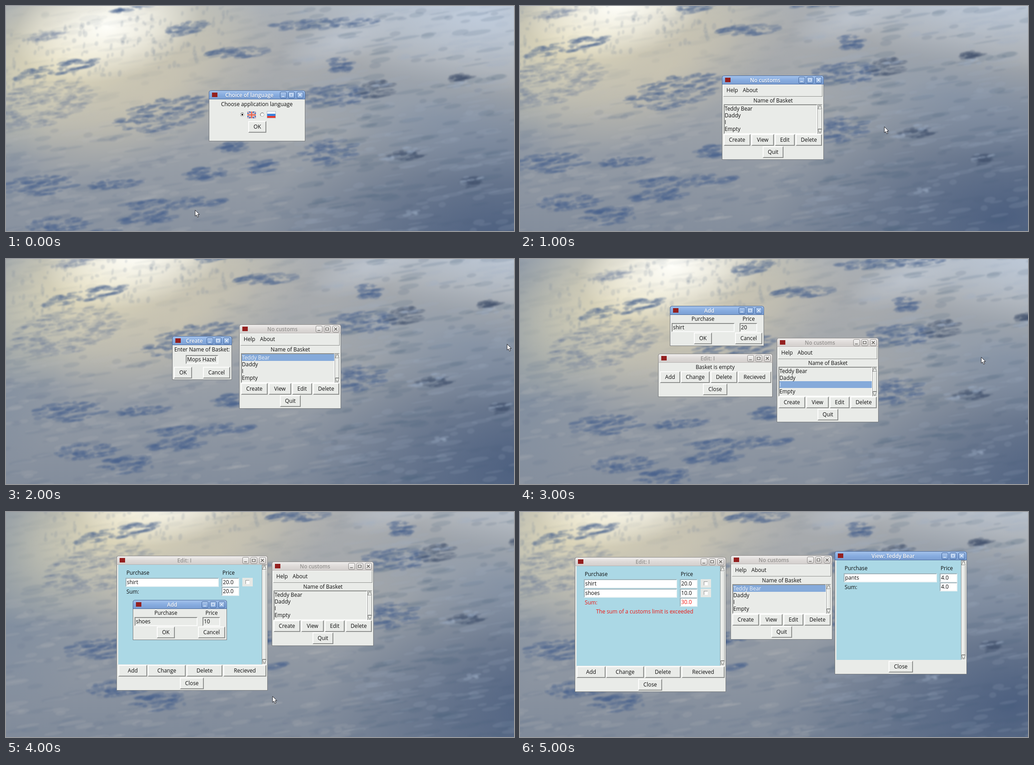
These frames come from a looping animation (1122 by 499 pixels, 6000 ms). An HTML page with a canvas:

```html
<!DOCTYPE html>
<html lang="en">
<head>
<meta charset="utf-8">
<title>Basket windows</title>
<style>
  html, body { margin: 0; width: 100%; height: 100%; overflow: hidden; }
  #stage { position: relative; width: 1122px; height: 499px; overflow: hidden; }
  #strip { position: absolute; left: 0; top: 0; width: 1122px; height: 2994px; animation: cut 6s steps(6) infinite; }
  #strip > canvas { position: absolute; left: 0; top: 0; }
  @keyframes cut { to { transform: translateY(-2994px); } }

  .scene { position: relative; width: 1122px; height: 499px; overflow: hidden; }
  .scene div, .scene svg { position: absolute; box-sizing: border-box; }
  .scene { font: 11.8px/16px "Open Sans", "Noto Sans", sans-serif; color: #0c0c0c; white-space: pre; }

  .win { background: #e9ebe8; border: 1px solid #777a7c; border-top: 0; border-radius: 5px 5px 0 0; }
  .bar { border: 1px solid #8d8b89; border-bottom-color: #b5b2b0; border-radius: 5px 5px 0 0;
         background: linear-gradient(#efedec, #dedad8 50%, #d3cfcd); }
  .on > .bar { border-color: #4a6a9c; background: linear-gradient(#a3c1ea, #88ade0 50%, #7b9fd3); }
  .title { text-align: center; font-weight: 600; font-size: 11.7px; color: #959391; }
  .on > .title { color: #fff; text-shadow: 0 1px 1px #4f70a3; }
  .icon { background: #94201f; }
  .tool { border: 1px solid #8b8987; border-radius: 3px; background: linear-gradient(#f5f4f3, #d6d3d1); color: #55534f; }
  .on > .tool { border-color: #44669c; background: linear-gradient(#a9c5eb, #7da2d6); color: #f4f8fd; }
  .tool svg { left: 0; top: 0; fill: none; stroke: currentColor; stroke-width: 1.2; }

  .mid { text-align: center; }
  .btn { text-align: center; border: 2px solid; border-color: #fdfdfc #8f918f #8f918f #fdfdfc; background: #e9ebe8;
         line-height: 21px; }
  .menu { border: 1px solid; border-color: #fcfcfb #8f918f #8f918f #fcfcfb; }
  .field { border: 2px solid; border-color: #8c8e8c #fafbfa #fafbfa #8c8e8c; padding-left: 1px; background: #e9ebe8; line-height: 15px; }
  .white { background: #fff; border-color: #9fb3ba #eef3f4 #eef3f4 #9fb3ba; }
  .pick { background: #85aada; }
  .pale { color: #eef1f5; }
  .red { color: #f01410; }
  .sheet { background: #abd8e5; }
  .check { background: #e6e8e5; }
  .tick { border: 1px solid; border-color: #8c8e8c #f6f6f5 #f6f6f5 #8c8e8c; background: #fff; }
  .rail { background: #c8cac7; border: 1px solid; border-color: #8c8e8c #fafbfa #fafbfa #8c8e8c; }
  .thumb { background: #e9ebe8; border: 1px solid; border-color: #fdfdfc #858785 #858785 #fdfdfc; }
</style>
</head>
<body>
<div id="stage"><div id="strip"><canvas id="sky" width="1122" height="2994"></canvas></div></div>
<script>
const W = 1122, H = 499;

// ---------- widgets ----------
const box = (cls, x, y, w, h, inner = '') =>
  `<div class="${cls}" style="left:${x}px;top:${y}px;width:${w}px;height:${h}px">${inner}</div>`;
const text = (x, y, s, cls = '') => `<div class="${cls}" style="left:${x}px;top:${y - 8}px">${s}</div>`;
const mid = (x, y, s) => box('mid', x - 110, y - 8, 220, 16, s);
const btn = (x, y, w, s) => box('btn', x, y, w, 26, s);
const field = (x, y, w, s, cls = '') => box('field ' + cls, x, y, w, 20, s);

const scroll = (x, y, h) => box('rail', x, y, 11, h) + box('thumb', x + 1, y + 11, 9, h - 22) +
  `<svg style="left:${x}px;top:${y}px" width="11" height="${h}" fill="#e9ebe8" stroke="#858785">
    <path d="M5.5 1.5 L10 10.5 H1 Z M1 ${h - 10.5} H10 L5.5 ${h - 1.5} Z"/></svg>`;

const glyphs = ['M3 9.5 H9', 'M3 3.5 H9.5 V9 H3 Z', 'M3 3 L9.5 9.5 M9.5 3 L3 9.5'];

function win(x, y, w, h, title, active, body) {
  const tools = [56, 38, 19].map((d, i) =>
    box('tool', w - d, 3, 15, 15, `<svg width="13" height="13"><path d="${glyphs[i]}"/></svg>`)).join('');
  return `<div style="left:${x}px;top:${y}px" class="${active ? 'on' : ''}">` +
    box('win', 0, 0, w, h) + box('bar', 0, 0, w, 20) + box('icon', 7, 5, 12, 10) +
    box('title', 22, 2, w - 78, 16, title) + tools + body + '</div>';
}

// ---------- windows ----------
function mainWin(x, y, picked = -1, active = false) {
  const rows = ['Teddy Bear', 'Daddy', 'I', 'Empty'].map((s, i) =>
    (i === picked ? box('pick', 6, 66 + 15 * i, 204, 15) : '') +
    text(6, 73 + 15 * i, s, i === picked ? 'pale' : '')).join('');
  return win(x, y, 225, 187, 'No customs', active,
    box('menu', 3, 20, 219, 27) + text(10, 32, 'Help') + text(46, 32, 'About') +
    mid(113, 55, 'Name of Basket') + box('field', 4, 64, 207, 66) + rows + scroll(211, 64, 66) +
    btn(4, 130, 59, 'Create') + btn(65, 130, 50, 'View') + btn(117, 130, 44, 'Edit') +
    btn(163, 130, 58, 'Delete') + btn(90, 157, 46, 'Quit'));
}

const addWin = (x, y, item, price) => win(x, y, 208, 89, 'Add', true,
  mid(73, 28, 'Purchase') + mid(174, 28, 'Price') + field(4, 38, 139, item) + field(154, 38, 39, price) +
  btn(53, 59, 40, 'OK') + btn(144, 59, 60, 'Cancel'));

function sheet(w, items, sum, over, checks) {
  const tone = over ? 'red' : '', end = 49 + 20.7 * items.length | 0;
  return box('sheet', 4, 20, w - 14, 221) + scroll(w - 10, 20, 221) +
    text(22, 37, 'Purchase') + text(234, 37, 'Price') +
    items.map(([s, p], i) => {
      const y = 49 + 21 * i;
      return field(20, y, 206, s, 'white') + field(232, y, 39, p, 'white') +
        (checks ? box('check', 278, y, 23, 19) + box('tick', 285, y + 5, 9, 9) : '');
    }).join('') +
    text(22, end + 10, 'Sum:', tone) + field(232, end, 39, sum, 'white ' + tone);
}

const editWin = (x, y, items, sum, over) => win(x, y, 334, 299, 'Edit: I', false,
  sheet(331, items, sum, over, true) +
  (over ? text(47, 120, 'The sum of a customs limit is exceeded', 'red') : '') +
  btn(4, 242, 64, 'Add') + btn(69, 242, 84, 'Change') + btn(155, 242, 79, 'Delete') +
  btn(236, 242, 95, 'Recieved') + btn(140, 270, 53, 'Close'));

const radio = (x, dot) => `<circle cx="${x}" cy="9" r="4" fill="#fff" stroke="#b5b7b4"/>
  <path d="M${x - 3} 12 A4 4 0 0 1 ${x + 3} 6" fill="none" stroke="#777"/>` +
  (dot ? `<circle cx="${x}" cy="9" r="1.9" fill="#111"/>` : '');
const choices = `<svg style="left:70px;top:45px" width="82" height="18">${radio(4, true)}${radio(48)}
  <rect x="15" y="2" width="19" height="15" fill="#2f62b4"/>
  <path d="M15 2 L34 17 M34 2 L15 17" stroke="#e6e6ee" stroke-width="2.6"/>
  <path d="M15 2 L34 17 M34 2 L15 17" stroke="#e0695f"/>
  <path d="M24.5 2 V17 M15 9.5 H34" stroke="#f0dcd8" stroke-width="4.4"/>
  <path d="M24.5 2 V17 M15 9.5 H34" stroke="#e8624a" stroke-width="2.6"/>
  <rect x="59" y="2" width="18" height="5" fill="#f8f8f8"/>
  <rect x="59" y="7" width="18" height="5" fill="#3c82dc"/>
  <rect x="59" y="12" width="18" height="5" fill="#ea3a2c"/>
  <rect x="58.5" y="1.5" width="19" height="15" fill="none" stroke="#b4bcc8"/></svg>`;

const pointer = (x, y) => `<svg style="left:${x}px;top:${y}px" width="14" height="20">
  <path d="M.8 .8 V14 L3.8 11.3 L6 16.4 L8.4 15.4 L6.2 10.4 H10.2 Z" fill="#fff" stroke="#1c1c22"/></svg>`;

// ---------- scenes: [sky dx, sky dy, markup] ----------
const scenes = [
  [0, 0, win(448, 187, 213, 113, 'Choice of language', true,
    mid(106, 30, 'Choose application language') + choices + btn(87, 68, 40, 'OK')) + pointer(417, 452)],
  [-7, -50, mainWin(446, 154, -1, true) + pointer(804, 267)],
  [63, -59, mainWin(515, 145, 0) + win(367, 171, 132, 97, 'Create', true,
    mid(66, 29, 'Enter Name of Basket:') + field(30, 42, 72, 'Mops Hazel') +
    btn(4, 68, 40, 'OK') + btn(68, 68, 60, 'Cancel')) + pointer(1106, 188)],
  [114, -30, mainWin(567, 175, 2) + win(305, 210, 253, 96, 'Edit: I', false,
    mid(126, 29, 'Basket is empty') + btn(4, 39, 45, 'Add') + btn(50, 39, 64, 'Change') +
    btn(116, 39, 59, 'Delete') + btn(176, 39, 74, 'Recieved') + btn(99, 66, 54, 'Close')) +
    addWin(331, 104, 'shirt', '20') + pointer(1018, 217)],
  [134, -94, editWin(244, 97, [['shirt', '20.0']], '20.0', false) + mainWin(587, 110) +
    addWin(280, 195, 'shoes', '10') + pointer(588, 408)],
  [12, -92, editWin(121, 100, [['shirt', '20.0'], ['shoes', '10.0']], '30.0', true) + mainWin(465, 96, 0) +
    win(695, 87, 292, 273, 'View: Teddy Bear', true,
      sheet(289, [['pants', '4.0']], '4.0', false, false) + btn(119, 243, 54, 'Close'))]
];
document.getElementById('strip').insertAdjacentHTML('beforeend',
  scenes.map(s => `<div class="scene">${s[2]}</div>`).join(''));

// ---------- soft cloudy backdrop ----------
const PAD = 135, SW = 1270, SH = 600;
let seed = 11;
const rnd = () => (seed = seed * 16807 % 2147483647) / 2147483647;

function layer() {
  const c = document.createElement('canvas');
  c.width = SW; c.height = SH;
  const g = c.getContext('2d');
  g.translate(PAD, 0);
  return [c, g];
}
const [sky, g] = layer(), [marks, m] = layer();

function fade(stops) {
  const f = g.createLinearGradient(0, 0, 0, SH);
  stops.forEach((c, i) => f.addColorStop(i / (stops.length - 1), c));
  g.fillStyle = f;
  g.fillRect(-PAD, 0, SW, SH);
}
function glow(x, y, rx, ry, turn, rgb, a) {
  g.save();
  g.translate(x, y); g.rotate(turn); g.scale(rx, ry);
  const f = g.createRadialGradient(0, 0, 0, 0, 0, 1);
  f.addColorStop(0, `rgba(${rgb},${a})`);
  f.addColorStop(.45, `rgba(${rgb},${a * .6})`);
  f.addColorStop(1, `rgba(${rgb},0)`);
  g.fillStyle = f;
  g.fillRect(-1, -1, 2, 2);
  g.restore();
}
function streak(x, y, rx, ry, rgb, a, tilt = -.16) {
  m.fillStyle = `rgba(${rgb},${a})`;
  m.beginPath();
  m.ellipse(x, y, rx, ry, tilt, 0, 7);
  m.fill();
}

fade(['#aab0b6', '#a8abae', '#a3a7ab', '#969da6', '#8a93a0', '#7f8a9a']);
glow(-150, 200, 260, 350, 0, '112,130,154', .9);
glow(150, 110, 440, 200, -.35, '238,228,190', .9);
glow(330, 190, 320, 130, -.5, '204,198,178', .8);
glow(225, 45, 210, 120, -.2, '255,255,250', 1);
glow(1050, 20, 440, 170, .1, '194,207,224', .9);
glow(740, 75, 150, 55, -.35, '194,202,213', .7);
glow(1080, 520, 540, 340, -.15, '70,90,124', .9);
glow(960, 250, 330, 130, .2, '122,141,168', .5);

// general mottling, calmer where the sun falls
for (let i = 0; i < 1300; i++) {
  const x = rnd() * SW - PAD, y = rnd() * SH, right = x > 640;
  const light = rnd() < .5;
  streak(x, y, 8 + rnd() * 24, 1.5 + rnd() * 5,
    light ? (right ? '158,174,196' : '190,190,186') : (right ? '72,92,124' : '98,114,140'),
    y < 260 && !right ? .06 : .15);
}

// clusters of dark water: x, y, rx, ry
const patches = [
  [510, 104, 68, 12], [110, 140, 100, 14], [90, 66, 44, 11], [740, 130, 30, 18], [725, 200, 75, 24],
  [350, 240, 105, 36], [400, 50, 45, 14], [315, 470, 60, 14], [370, 438, 112, 13], [75, 398, 78, 22],
  [565, 356, 36, 14], [700, 40, 130, 11], [290, 2, 60, 8], [820, 185, 38, 20], [1002, 160, 22, 8],
  [715, 325, 62, 28], [500, 312, 32, 10], [205, 515, 65, 20], [110, 485, 70, 18], [440, 372, 45, 14],
  [1030, 390, 18, 12], [880, 332, 42, 10], [240, 395, 60, 10], [70, 220, 120, 50]
];
patches.forEach(([x, y, rx, ry]) => {
  const hazy = x < 100 && y < 300, n = 22 + rx * ry / 28;
  for (let i = 0; i < n; i++) {
    const t = rnd() * 6.283, r = Math.sqrt(rnd());
    const dx = Math.cos(t) * r * rx;
    streak(x + dx, y + Math.sin(t) * r * ry - dx * (x < 450 && y < 300 ? .2 : .05),
      4 + rnd() * 13, 1.5 + rnd() * 3, x > 800 ? '66,82,110' : '66,94,138', hazy ? .12 : .26);
  }
});

// upright flecks on the sunlit side
for (let i = 0; i < 170; i++) {
  const x = rnd() * 560 - 60, y = 130 - x * .15 + (rnd() - .5) * 130;
  streak(x, y, 2 + rnd() * 3, 3 + rnd() * 5, '120,134,156', .2, .15);
}
// cloud tops catching light
[[890, 320], [1030, 384], [845, 335], [825, 172], [1000, 175], [895, 460]].forEach(([x, y]) => {
  for (let i = 0; i < 7; i++) streak(x + rnd() * 44 - 22, y + rnd() * 12 - 6, 4 + rnd() * 8, 3, '156,171,194', .3);
});

g.filter = 'blur(1.6px)';
g.drawImage(marks, -PAD, 0);

const out = document.getElementById('sky').getContext('2d');
scenes.forEach(([dx, dy], i) => out.drawImage(sky, PAD - dx, -dy, W, H, 0, i * H, W, H));
</script>
</body>
</html>
```
